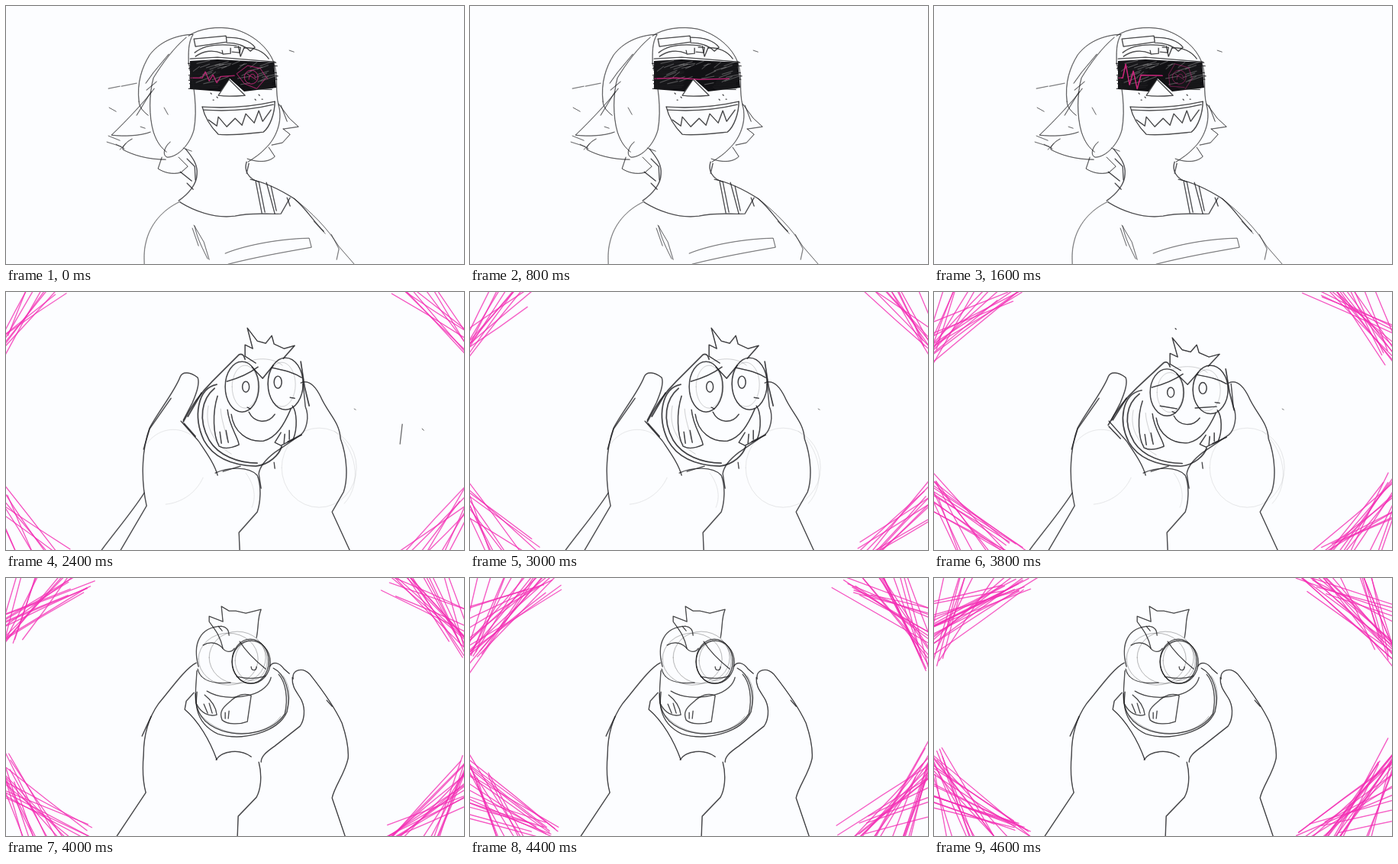
Animation, 600 px wide and 338 px high, one loop 4.8 s. Source, as an HTML page with a canvas:

```html
<!DOCTYPE html>
<html lang="en">
<head>
<meta charset="utf-8">
<title>Sketch loop</title>
<style>
html, body { margin: 0; width: 100%; height: 100%; overflow: hidden; background: #fcfdff; }
canvas { display: block; width: 600px; height: 338px; }
</style>
</head>
<body>
<canvas id="stage" width="600" height="338"></canvas>
<script>
const ctx = document.getElementById('stage').getContext('2d');
const STEP = 200, LOOP = 4800, PAPER = '#fcfdff', INK = '#1d1d20', PINK = '#f32fb4';

function seeded(n) {
  let s = n * 7919 + 17;
  return () => {
    s = (s + 0x6D2B79F5) | 0;
    let t = Math.imul(s ^ (s >>> 15), 1 | s);
    t = (t + Math.imul(t ^ (t >>> 7), 61 | t)) ^ t;
    return ((t ^ (t >>> 14)) >>> 0) / 4294967296;
  };
}

// Two slightly shifted passes give the pencil look.
function pencil(paths, width = 1.1, alpha = .6, color = INK) {
  ctx.save();
  ctx.strokeStyle = color;
  ctx.lineWidth = width;
  ctx.globalAlpha = alpha;
  ctx.lineCap = ctx.lineJoin = 'round';
  for (const d of paths) {
    const p = new Path2D(d);
    ctx.stroke(p);
    ctx.translate(.35, .3);
    ctx.stroke(p);
    ctx.translate(-.35, -.3);
  }
  ctx.restore();
}

const oval = (x, y, rx, ry) =>
  `M${x - rx} ${y}a${rx} ${ry} 0 1 1 ${2 * rx} 0a${rx} ${ry} 0 1 1 ${-2 * rx} 0`;

const portrait = {
  hair: [
    'M174 125C171 100 178 80 188 64C200 48 220 38 245 37C238 48 239 62 239 75C246 100 251 135 246 162C241 181 225 198 211 198C203 195 209 182 215 178',
    'M239 39C253 29 277 26 298 30C322 36 344 54 351 75C357 94 352 112 357 130',
    'M236 41C220 54 204 76 193 94C187 115 187 145 193 165C198 180 204 186 210 191',
    'M174 125C174 133 181 139 186 143M183 101L193 87L213 63M184 110L197 99',
    'M194 108C184 122 158 150 138 169C155 171 176 170 189 165M190 112L171 143',
    'M165 174C157 178 152 184 153 188C166 195 185 201 209 201',
    'M204 198L199 213C207 218 217 221 229 218L238 210L226 198',
    'M357 128L371 147L383 158L363 161M360 130L368 151',
    'M363 161L372 168L362 179L348 182M344 185L352 197C343 206 327 204 316 200',
    'M357 130C363 151 353 174 340 186C334 193 325 199 317 204'
  ],
  face: [
    'M246 43L288 39L289 47L248 53ZM289 41C306 41 319 45 326 54L320 59C312 51 301 48 289 48',
    'M247 61C260 50 279 49 302 52M304 52L307 66L312 54M283 58L284 63L294 62L294 55',
    'M248 66C259 58 272 57 283 62M299 54L307 54L306 61L296 60M312 55C325 53 338 60 344 69',
    'M241 69L277 67L352 73M257 132C286 134 321 132 352 125',
    'M352 125C352 140 346 158 337 165C318 167 294 170 278 168C266 156 260 145 257 132',
    'M265 149L276 157L278 145L289 158L300 147L309 156L314 141L325 153L331 137L336 151L347 136',
    'M259 136C288 138 321 136 350 129M278 117L292 96L313 117C301 118 290 119 278 117',
    'M268 114l1 1M276 119l1 1M271 123l1 0M326 122l1 1M331 116l1 1M335 122l1 0'
  ],
  body: [
    'M235 187C245 199 251 208 250 220C250 233 239 246 226 255',
    'M237 200L247 210L248 228M228 217L243 229M237 232L245 240',
    'M315 204C311 216 318 226 330 230M318 206L315 219',
    'M228 257C244 267 272 279 300 275C320 270 340 273 360 272L372 251',
    'M327 230L335 271M331 230L339 270M341 231L352 272M347 236L354 268',
    'M320 227C340 231 358 240 377 252C392 264 401 280 416 295M368 251L372 262'
  ],
  light: [
    'M228 256C204 267 188 287 183 310C180 322 181 332 181 338',
    'M377 252C400 270 421 291 436 315L456 338M403 282L418 298M426 299L436 318L433 332',
    'M287 324C308 315 352 305 397 304L400 316C366 322 326 329 291 338',
    'M247 288C250 304 258 319 264 331M246 287L259 309L266 332',
    'M244 291L252 314M232 186L243 190M134 108L149 105M151 105L171 101M135 133L144 138M207 133L212 142',
    'M132 178L151 184M134 170L149 176M144 181L155 187M149 188L157 180M371 58l6 2M176 158L182 160'
  ]
};

// [start x, height] of the heartbeat on the visor; 0 leaves a flat line.
const beats = [[257, 8], [267, 7], [274, 5], 0, 0, 0, 0,
  [243, 17], [247, 18], [256, 17], [265, 16], [275, 13]];

function visor(i) {
  ctx.fillStyle = '#111114';
  ctx.fill(new Path2D('M241 72L277 70L351 74L354 107L312 112L293 95L281 112L241 109Z'));
  const rnd = seeded(3), dark = [], pale = [];
  for (let k = 0; k < 17; k++) {
    const y = 73 + k * 2.2, x = 238 + rnd() * 5;
    dark.push(`M${x} ${y}L${x + 38} ${y - 2 + rnd() * 2}M${318 + rnd() * 6} ${y}L${347 + rnd() * 9} ${y + 1}`);
  }
  for (let k = 0; k < 34; k++) {
    const x = 242 + rnd() * 95, y = 75 + rnd() * 28;
    if (Math.abs(x - 288) < 12 && y > 88) continue;
    pale.push(`M${x} ${y}l${8 + rnd() * 12} ${-2 - rnd() * 5}`);
  }
  pencil(dark, 1, .7);
  pencil(pale, .6, .28, PAPER);

  const beat = beats[i];
  if (!beat) {
    const y = 95 + (i % 2);
    pencil([`M242 ${y}L270 ${y - 1}L300 ${y + 1}L339 ${y}`], 1.2, .65, '#dc2785');
    return;
  }
  const [x, a] = beat, y = 94;
  pencil([`M242 ${y}L${x} ${y}l4 ${-a}l5 ${1.5 * a}l5 ${-a}l5 ${1.3 * a}l5 ${-a}L299 91`],
    1.2, i > 6 ? .75 : .55, '#dc2785');
  const ring = [];
  for (let k = 0; k < 7; k++) {
    const q = k * 1.047 + .2 + i * .13, r = 18 + 3 * Math.sin(k * 2.4);
    ring.push(`${322 + r * Math.cos(q)} ${92 + r * .85 * Math.sin(q)}`);
  }
  pencil(['M' + ring.join('L'), oval(321, 93, 9, 9), 'M316 89L327 96M318 96C318 88 326 87 326 93'],
    1, i === 8 ? .28 : .5, '#cf2880');
}

const holding = {
  hands: [
    'M232 168L244 145C249 133 254 120 251 112C242 105 231 103 228 111C221 130 199 157 188 178C178 205 176 244 184 280L150 338',
    'M181 263C165 288 142 315 125 338M229 169L252 195C262 210 273 225 277 240',
    'M274 237C291 229 318 228 329 240C335 255 333 276 329 288L305 315L306 338',
    'M386 119C397 114 405 123 412 137C421 158 437 170 438 192C447 216 448 245 442 262L427 288L450 338',
    'M389 120L392 150C398 164 393 181 386 187L352 210C339 220 332 230 331 238L334 257',
    'M216 139L188 179L180 206M351 223l1 8M284 235L307 228'
  ],
  faint: [
    'M184 199C197 180 222 174 242 187M209 278C230 276 249 263 258 243M314 237C325 252 328 268 322 282',
    oval(410, 230, 49, 52), 'M430 182C458 204 468 250 443 277'
  ],
  shell: [
    'M232 170C243 148 259 128 270 117L305 82C309 80 312 83 313 88',
    'M276 121C250 126 245 164 259 194C272 218 298 227 327 228C345 226 358 213 361 202',
    'M273 126C256 140 251 167 266 194C278 214 304 224 329 224',
    'M386 91L391 124L397 149M369 196L387 187M233 172L248 189M256 132L238 163'
  ],
  critter: [
    oval(309, 124, 22, 33), oval(366, 120, 23, 34),
    oval(314, 124, 4.5, 7), oval(356, 118, 5, 8),
    'M289 117C304 113 318 107 330 98M348 99C361 102 375 104 387 112',
    'M322 98L336 113L350 96M316 151l4 2M372 138l6 1',
    'M318 157C325 172 343 173 352 160',
    'M295 160C298 184 317 197 337 195C354 191 364 174 373 153',
    'M277 136C270 158 271 187 279 202C286 206 296 204 305 200C304 190 292 176 290 154',
    'M280 183L282 198M288 181L291 197M360 184L352 197L360 201L376 193C382 178 381 157 375 149M365 186L364 198M371 181L371 193',
    'M327 93L313 84L313 69L323 74L316 47L329 64L340 67L348 57L351 68L364 74L378 70L363 87'
  ],
  soft: [
    'M313 93C330 84 352 87 362 96', oval(313, 124, 17, 28), oval(361, 121, 18, 29),
    'M265 149C259 177 274 200 295 212M281 153C282 169 287 178 289 193'
  ]
};

function drawHolding(i) {
  pencil(holding.hands, 1.15, .6);
  pencil(holding.faint, .6, .09);
  ctx.save();
  const wince = i >= 18;
  if (wince) ctx.transform(1, 0, 0, .93, -4, 16.1);
  pencil(holding.shell, 1.5, .6);
  pencil(holding.critter, 1.2, .65);
  pencil(holding.soft, .6, .18);
  if (wince) pencil(['M300 143L322 147M346 146L374 144', 'M320 34l1 1'], 1.2, .65);
  ctx.restore();
  pencil(['M456 153l2 1'], .8, .4);
  if (i % 2 === 0) pencil(['M519 173L516 199', 'M545 179l2 2'], .9, .55);
}

const glaring = {
  hands: [
    'M249 111C235 118 216 145 200 164C185 185 180 207 180 232C178 255 180 270 183 281L145 338',
    'M190 181L178 207M246 150L236 161L234 172C252 187 267 213 276 238',
    'M275 238C283 226 306 223 321 234M331 241C336 260 333 278 328 287L304 312L303 338',
    'M376 132C374 120 388 116 398 126C413 145 429 166 440 190C446 208 449 222 448 236C444 256 430 273 427 288L444 338',
    'M375 130C374 144 382 150 387 160C393 173 390 187 385 194L352 220C339 229 334 234 334 241',
    'M345 116C350 108 358 111 364 119L371 125M420 160L427 168'
  ],
  critter: [
    oval(320, 109, 24, 29), oval(321, 110, 25, 28),
    'M250 121C247 160 244 188 277 204C308 214 356 203 368 175C374 150 365 125 350 118',
    'M248 151C247 179 262 193 283 200C315 210 350 200 365 178C370 157 366 136 357 126',
    'M252 116C244 87 253 64 282 63C290 64 292 70 292 75M251 119C254 134 271 139 294 137',
    'M258 88C266 83 275 84 282 90C288 99 296 97 299 92',
    'M306 83C314 96 330 111 340 119M302 129C315 132 329 132 340 128',
    'M321 116C321 122 328 122 328 116',
    'M263 148C276 156 297 159 320 153C336 149 345 139 347 130',
    'M250 149L249 164C255 177 266 182 276 179C275 170 269 160 260 153M259 165L264 177M266 164L270 177',
    'M283 186C278 174 286 168 293 162C302 153 313 150 321 154L316 188C306 192 290 192 283 186',
    'M287 176L287 184M292 174L291 184',
    'M284 92C280 74 273 67 266 57L266 50L284 57L282 37L292 43L301 43L314 46L334 41C329 53 331 63 328 78M278 63L283 69'
  ],
  soft: [
    oval(291, 106, 39, 34), oval(303, 104, 37, 34), oval(321, 108, 21, 26),
    'M256 180C281 211 338 211 360 181M363 128C380 154 368 185 346 197'
  ]
};

// Lines tangent to an ellipse that closes in on the picture from the corners.
function corners(i) {
  const rnd = seeded(i), p = ((i - 12) / 11) ** 1.5;
  const a = 327 - 27 * p, b = 211 - 27 * p;
  const count = Math.round(9 + 16 * p), low = .38 - .2 * p, high = 1.02 + .36 * p;
  const lines = [];
  for (const sx of [-1, 1]) for (const sy of [-1, 1]) for (let k = 0; k < count; k++) {
    const q = low + (high - low) * rnd(), c = Math.cos(q), s = Math.sin(q);
    const inset = 300 * c + 169 * s - Math.hypot(a * c, b * s) - rnd() * 24;
    const half = 52 + 40 * rnd() + 20 * p, shift = (rnd() - .5) * 26, bend = rnd() * 6 - 3;
    const at = (along, out) =>
      `${300 + sx * (300 - (inset - out) * c - along * s)} ${169 + sy * (169 - (inset - out) * s + along * c)}`;
    lines.push(`M${at(shift - half, 0)}Q${at(shift, bend)} ${at(shift + half, 0)}`);
  }
  pencil(lines, 1.1, .6, PINK);
}

function frame(now) {
  const i = Math.floor((now % LOOP) / STEP);
  ctx.fillStyle = PAPER;
  ctx.fillRect(0, 0, 600, 338);
  if (i < 12) {
    visor(i);
    pencil(portrait.hair, 1, .52);
    pencil(portrait.face, 1.1, .62);
    pencil(portrait.body, 1.1, .58);
    pencil(portrait.light, 1, .4);
  } else {
    if (i < 20) drawHolding(i);
    else {
      pencil(glaring.hands, 1.1, .65);
      pencil(glaring.critter, 1.05, .62);
      pencil(glaring.soft, .7, .25);
    }
    corners(i);
  }
  requestAnimationFrame(frame);
}
requestAnimationFrame(frame);
</script>
</body>
</html>
```
